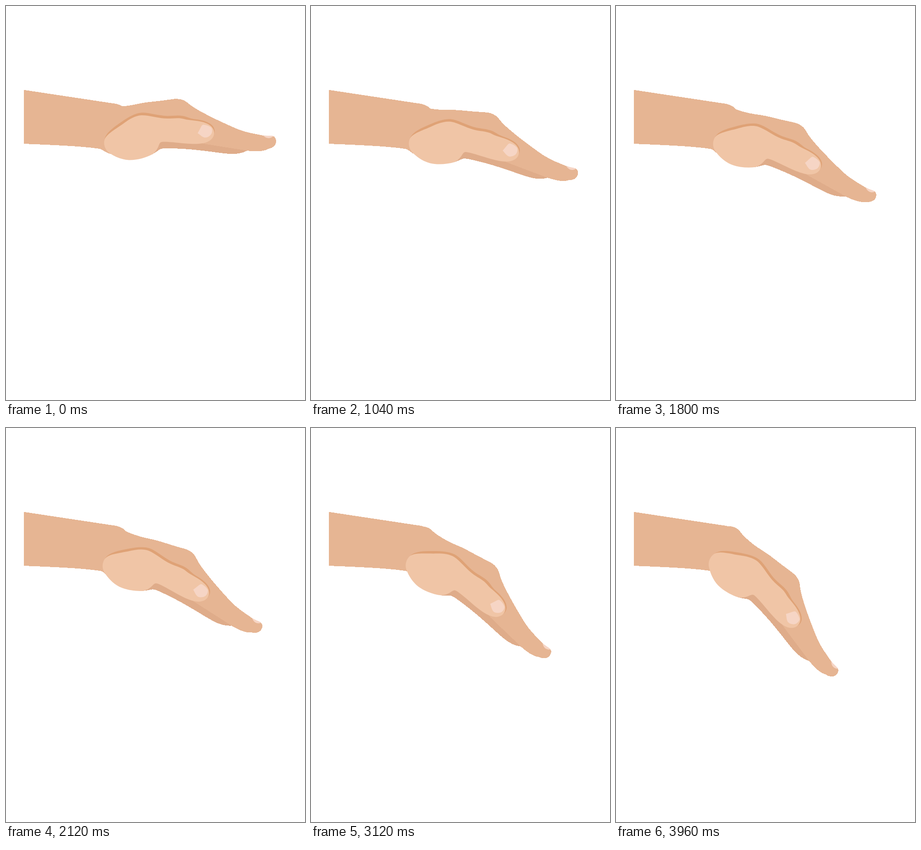
Write an HTML page that moves like this. It is 652 by 858 pixels and loops after 4 s.

```html
<!DOCTYPE html>
<html lang="en">
<head>
<meta charset="utf-8">
<title>Wrist bend</title>
<style>
  html, body { margin: 0; width: 100%; height: 100%; overflow: hidden; background: #fff; }
  svg { display: block; width: 100%; height: 100%; }
  .skin { fill: #e6b593; }
  .shade { fill: #dfac8a; }
  .skin, .shade { shape-rendering: crispEdges; }
  .crease { fill: #dfa276; }
  .light { fill: #f0c5a6; }
  .nail { fill: #f6d5c5; }
</style>
</head>
<body>
<svg viewBox="0 0 652 858">
  <path class="skin" d="M38.600 182.700L240 213C249 215 258 219 263 227C270 240 268 270 250 292C240 305 225 317 213 314.500Q209 311.500 205 311C160 304.500 95 302.500 38.600 300Z"/>
  <g id="hand">
    <path class="skin" d="M193.500 229C200 221 212 215.500 224 218.400C235 220 245 219 253 218.500C272 217.500 285 213 305 210C325 207.500 345 206 364 202.800C372 201.500 381 202 389 206C396 209.500 400 215 409 220.500C430 234 470 253 500 266C520 275 540 278 561 282C572 284 580 281 585 284.500C590 289 590 297 587 302C583 308 577 310 572 311C562 317 545 317.500 525 315L340 303L300 318L228 322.500C218 318.500 212 314.500 205 311L190 305Z"/>
    <path class="shade" d="M330 292L400 294L437 301L526 315C515 321 500 323 487 322C460 320 420 312 370 310.300C350 309.500 342 309.500 337 311.500C332 313.500 328 318.500 318 323.500L300 305Z"/>
    <path class="crease" d="M214.500 293C216 278 232 266 248 255C265 243 280 234 294 232.500C310 231 330 239 352 239.500C365 239.500 375 237.500 386 239.500C395 241 400 245 412 246.500C430 248.500 445 253 452 263C456 269 455.500 277 452 282L300 280Z"/>
    <path class="light" d="M214.500 292C218 280 236 270 254 257.500C268 247 282 238.500 295 238C312 237.500 332 245 352 245C366 245 377 242.500 388 246C400 250 420 248 437 255.500C448 260 454 268 454 276C454 287 445 296 430 298.800C415 301.300 405 300.300 390 299.300C370 297.300 352 295.300 342 295.800C336 296 335 299 333 304C331 310 326 318 320 322.500C305 330.500 285 336 268 335.500C252 334.500 238 328.500 226 320.500C216 313.500 212.500 302 214.500 292Z"/>
    <path class="nail" d="M418 277L426 262Q428 258 431 258.500C437 259 443 261 447.500 264.500C450.500 270 450 277 446 281C442 285 437 287 433 286.500C427 285 423 280 418 277Z"/>
    <path class="nail" d="M560.500 281.800C565 286.500 570 288.500 575 287.500C580 286.500 582 284 582.500 282.700C575 282 568 283 560.500 281.800Z"/>
  </g>
</svg>
<script>
  const LOOP = 4000, STEP = 40, BEND = 44.2;
  const from = { x: 186, y: 273 }, to = { x: 207, y: 240.4 };
  const hand = document.getElementById("hand");
  const mix = (a, b, p) => a + (b - a) * p;

  // The wrist joint slides in a straight line while the hand turns around it.
  function draw(ms) {
    const p = Math.floor((ms % LOOP) / STEP) * STEP / (LOOP - STEP);
    const x = mix(from.x, to.x, p), y = mix(from.y, to.y, p);
    hand.setAttribute("transform",
      `translate(${x} ${y}) rotate(${BEND * p}) translate(${-from.x} ${-from.y})`);
  }

  let start;
  function tick(now) {
    start ??= now;
    draw(now - start);
    requestAnimationFrame(tick);
  }
  draw(0);
  requestAnimationFrame(tick);
</script>
</body>
</html>
```
